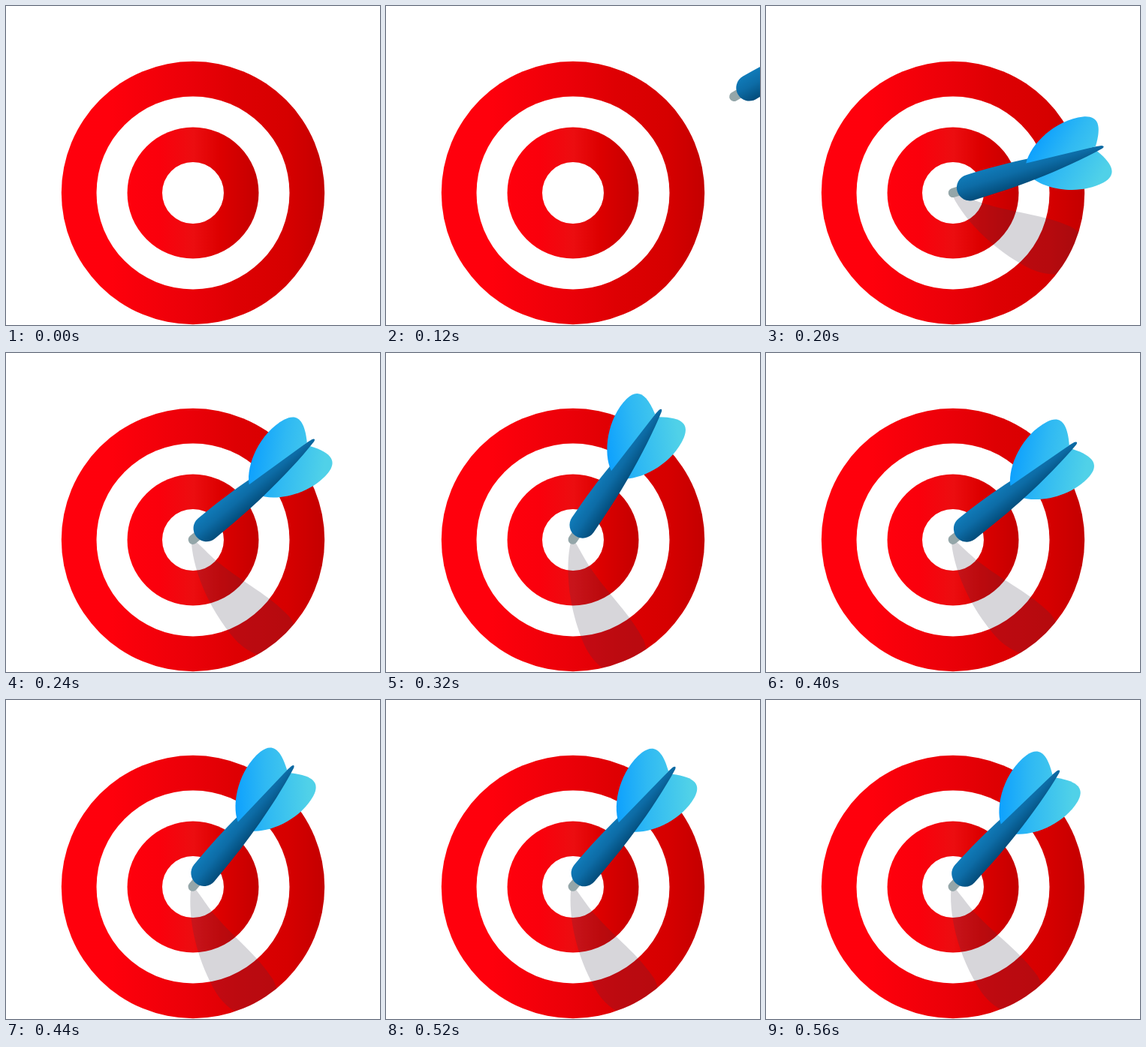
An HTML page with a canvas that plays this animation: 498x425 px, repeating every 0.6 s.

```html
<!DOCTYPE html>
<html lang="en">
<head>
<meta charset="utf-8">
<title>Dart hitting a target</title>
<style>
  html, body { margin: 0; width: 100%; height: 100%; overflow: hidden; background: #fff; }
  canvas { display: block; }
</style>
</head>
<body>
<canvas id="stage" width="498" height="425"></canvas>
<script>
const ctx = document.getElementById('stage').getContext('2d');
const LOOP = 600, STEP = 40, ENTER = 120, HIT = 200;
const CENTER = { x: 249, y: 249 }, RADIUS = 175.2;
const ENTRY = { x: 463, y: 121 }, BULL = { x: 248.5, y: 249 };
const ENTRY_ANGLE = 30, SHADOW_LEAD = 11.2;

// Wobble after the hit: [time in ms, tilt in degrees]
const WOBBLE = [[HIT, 17.1], [280, 62], [400, 38.2], [440, 50.2], [480, 51.5], [560, 47.5]];

const RED = [[0, '#ff000d'], [0.18, '#ff000c'], [0.5, '#ea0008'], [0.66, '#de0003'], [0.86, '#d60000'], [1, '#c40000']];
const INNER_RED = [[0, '#ff000d'], [0.25, '#fa000c'], [0.5, '#ec0d10'], [0.7, '#dd0000'], [1, '#c40000']];

const lerp = (a, b, p) => a + (b - a) * p;
const smooth = p => p * p * (3 - 2 * p);
const rad = deg => deg * Math.PI / 180;

function gradient(x0, y0, x1, y1, stops) {
  const g = ctx.createLinearGradient(x0, y0, x1, y1);
  stops.forEach(([at, color]) => g.addColorStop(at, color));
  return g;
}

const fins = gradient(38.5, 42, 108, 118, [[0, '#0a9eff'], [0.45, '#2fb9f3'], [1, '#50d1e8']]);
const barrel = gradient(0, -17.5, 0, 17.5, [[0, '#107bb9'], [0.45, '#0d6ca6'], [1, '#034c7a']]);

const finPath = new Path2D('M105,-9 C118,-32 160,-53 196,-46 C214,-42 218,-30 200,-3 Z');
const barrelPath = new Path2D('M24,-17.5 C55,-17.5 85,-16.5 110,-14 C145,-10 180,-6 208,-2 ' +
  'Q213,0 208,2 C180,8 145,12.5 110,15 C85,17 55,17.5 24,17.5 A17.5,17.5 0 0 1 24,-17.5 Z');
const shadowPath = new Path2D('M-3,0 C25,22 80,42 140,40 C165,38 190,24 205,0 ' +
  'C195,-25 180,-34 160,-35 C120,-32 90,-17 47,-8 C30,-4 8,-4 -3,0 Z');

function disc(r, fill) {
  ctx.beginPath();
  ctx.arc(CENTER.x, CENTER.y, r, 0, 2 * Math.PI);
  ctx.fillStyle = fill;
  ctx.fill();
}

function drawBoard() {
  const redDisc = (r, stops) => disc(r, gradient(CENTER.x - r, 0, CENTER.x + r, 0, stops));
  redDisc(RADIUS, RED);
  disc(128.5, '#fff');
  redDisc(87.5, INNER_RED);
  disc(41, '#fff');
}

// The shadow mirrors the dart below the bull and shows only on the board.
function drawShadow({ x, y, angle }) {
  ctx.save();
  ctx.beginPath();
  ctx.arc(CENTER.x, CENTER.y, RADIUS, 0, 2 * Math.PI);
  ctx.clip();
  ctx.translate(x, 2 * BULL.y - y);
  ctx.rotate(rad(angle + SHADOW_LEAD));
  ctx.fillStyle = 'rgba(55, 50, 70, 0.2)';
  ctx.fill(shadowPath);
  ctx.restore();
}

function drawFin(side) {
  ctx.save();
  // Clip to the mirrored outline so that both fins share one gradient.
  const path = new Path2D();
  path.addPath(finPath, new DOMMatrix().scale(1, side));
  ctx.fillStyle = fins;
  ctx.fill(path);
  ctx.restore();
}

function drawDart({ x, y, angle }) {
  ctx.save();
  ctx.translate(x, y);
  ctx.rotate(-rad(angle));
  ctx.beginPath();
  ctx.moveTo(0.5, 0);
  ctx.lineTo(18, 0);
  ctx.lineWidth = 12.5;
  ctx.lineCap = 'round';
  ctx.strokeStyle = '#94a6a9';
  ctx.stroke();
  drawFin(-1);
  ctx.fillStyle = barrel;
  ctx.fill(barrelPath);
  drawFin(1);
  ctx.restore();
}

function wobbleAngle(t) {
  for (let i = 1; i < WOBBLE.length; i++) {
    const [t0, a0] = WOBBLE[i - 1], [t1, a1] = WOBBLE[i];
    if (t <= t1) return lerp(a0, a1, smooth((t - t0) / (t1 - t0)));
  }
  return WOBBLE[WOBBLE.length - 1][1];
}

function dartPose(t) {
  if (t >= HIT) return { ...BULL, angle: wobbleAngle(t) };
  const p = (t - ENTER) / (HIT - ENTER);
  return {
    x: lerp(ENTRY.x, BULL.x, p),
    y: lerp(ENTRY.y, BULL.y, p),
    angle: lerp(ENTRY_ANGLE, WOBBLE[0][1], p)
  };
}

function draw(t) {
  ctx.fillStyle = '#fff';
  ctx.fillRect(0, 0, 498, 425);
  drawBoard();
  if (t < ENTER) return;
  const pose = dartPose(t);
  drawShadow(pose);
  drawDart(pose);
}

const start = performance.now();
function tick() {
  const t = (performance.now() - start) % LOOP;
  draw(Math.floor(t / STEP) * STEP);
  requestAnimationFrame(tick);
}
tick();
</script>
</body>
</html>
```
